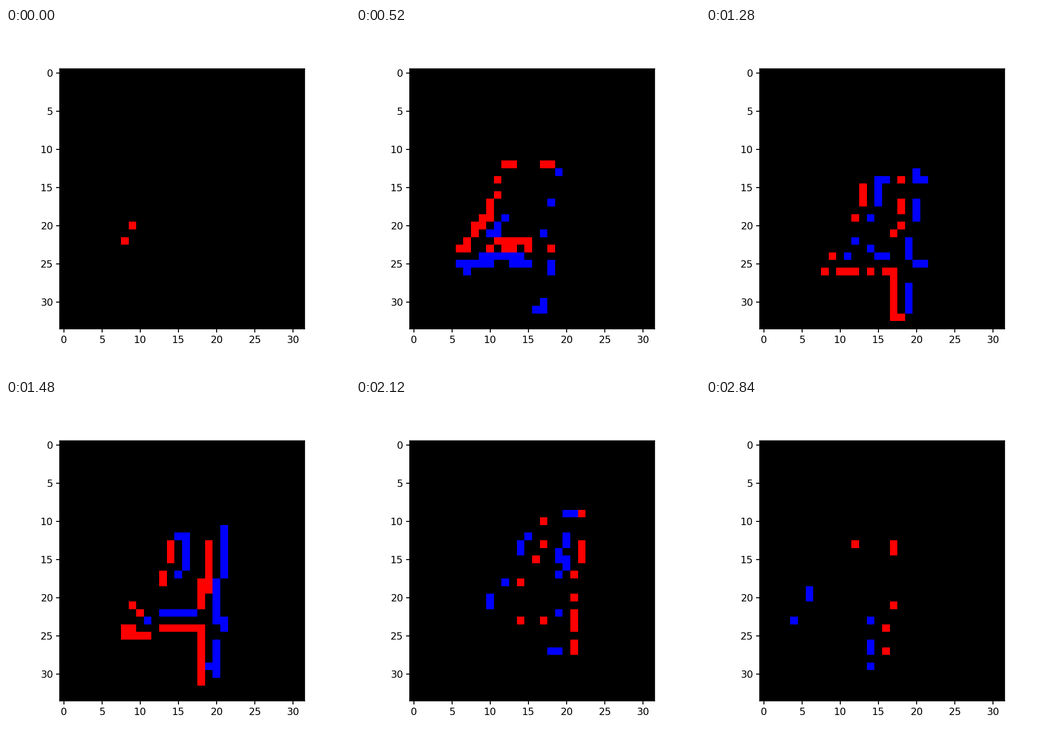
Write a matplotlib script that moves like this. It is 748 px wide and 748 px high and loops after 2880 ms.

```python
import numpy as np
import matplotlib.pyplot as plt
from matplotlib.animation import FuncAnimation

# Event-camera view of a handwritten 4 that is moved along a triangle in
# three sweeps: cells the ink enters turn blue, cells it leaves turn red.
SIZE, DPI = 748, 156
ROWS, COLS = 34, 32
FRAMES, SWEEP = 72, 24
RED, BLUE = (255, 0, 0), (0, 0, 255)

STROKES = [
    [(13.9, 11), (13.4, 14), (12, 17), (8, 22.2)],
    [(8, 22.2), (12, 21.2), (16, 21.3), (19, 22.1)],
    [(19.1, 10.6), (18.2, 16), (17.6, 20), (17.4, 27.8)],
]
PEN = 1.0      # half the pen width, in cells
CORNERS = np.array([(-2.5, 0.2), (0.1, 4.3), (2.6, -1.1), (-2.5, 0.2)])
HEADINGS = np.array([(0.1, 1), (0.75, -0.65), (-1, 0)])

X, Y = np.meshgrid(np.arange(COLS), np.arange(ROWS))


def distance(x, y, a, b):
    """Distance from each point to the segment a-b."""
    (ax, ay), (bx, by) = a, b
    dx, dy = bx - ax, by - ay
    t = np.clip(((x - ax) * dx + (y - ay) * dy) / (dx * dx + dy * dy), 0, 1)
    return np.hypot(x - ax - t * dx, y - ay - t * dy)


def ink(offset):
    """Soft coverage of every cell by the digit moved by offset."""
    x, y = X - offset[0], Y - offset[1]
    gap = np.min([distance(x, y, a, b)
                  for stroke in STROKES for a, b in zip(stroke, stroke[1:])], axis=0)
    return np.clip(PEN + 0.5 - gap, 0, 1)


def picture(i):
    rng = np.random.default_rng(400 + i)
    leg, j = divmod(i, SWEEP)
    t = j / (SWEEP - 1)

    # Slow start, then ease along one side of the triangle
    s = t ** 1.3
    spot = CORNERS[leg] + (CORNERS[leg + 1] - CORNERS[leg]) * s * s * (3 - 2 * s)
    step = 0.75 * HEADINGS[leg]
    change = ink(spot + step) - ink(spot - step)

    # Events swell in mid-sweep, when the digit moves fastest
    rate = 1.8 * np.exp(-((j - 11.5) / 5.5) ** 2) + 0.2 * t
    fired = rng.random(change.shape) < rate * change ** 2

    grid = np.zeros((ROWS, COLS, 3), np.uint8)
    grid[fired & (change > 0)] = BLUE
    grid[fired & (change < 0)] = RED
    for _ in range(rng.poisson(1.2)):
        grid[rng.integers(4, ROWS), rng.integers(COLS)] = RED
    return grid


pictures = [picture(i) for i in range(FRAMES)]

plt.rcParams["font.family"] = "DejaVu Sans"
plt.rcParams["axes.linewidth"] = 1.1
fig = plt.figure(figsize=(SIZE / DPI, SIZE / DPI), dpi=DPI)
CELL = 16.61
ax = fig.add_axes([117.45 / SIZE, 93.8 / SIZE, COLS * CELL / SIZE, ROWS * CELL / SIZE])
image = ax.imshow(pictures[0], interpolation="nearest", aspect="auto")
ax.set_xticks(range(0, COLS, 5))
ax.set_yticks(range(0, ROWS, 5))
ax.tick_params(width=1)


def update(i):
    image.set_data(pictures[i])
    return (image,)


anim = FuncAnimation(fig, update, frames=FRAMES, interval=1000 // 25,
                     repeat=True, repeat_delay=0)
plt.show()
```
